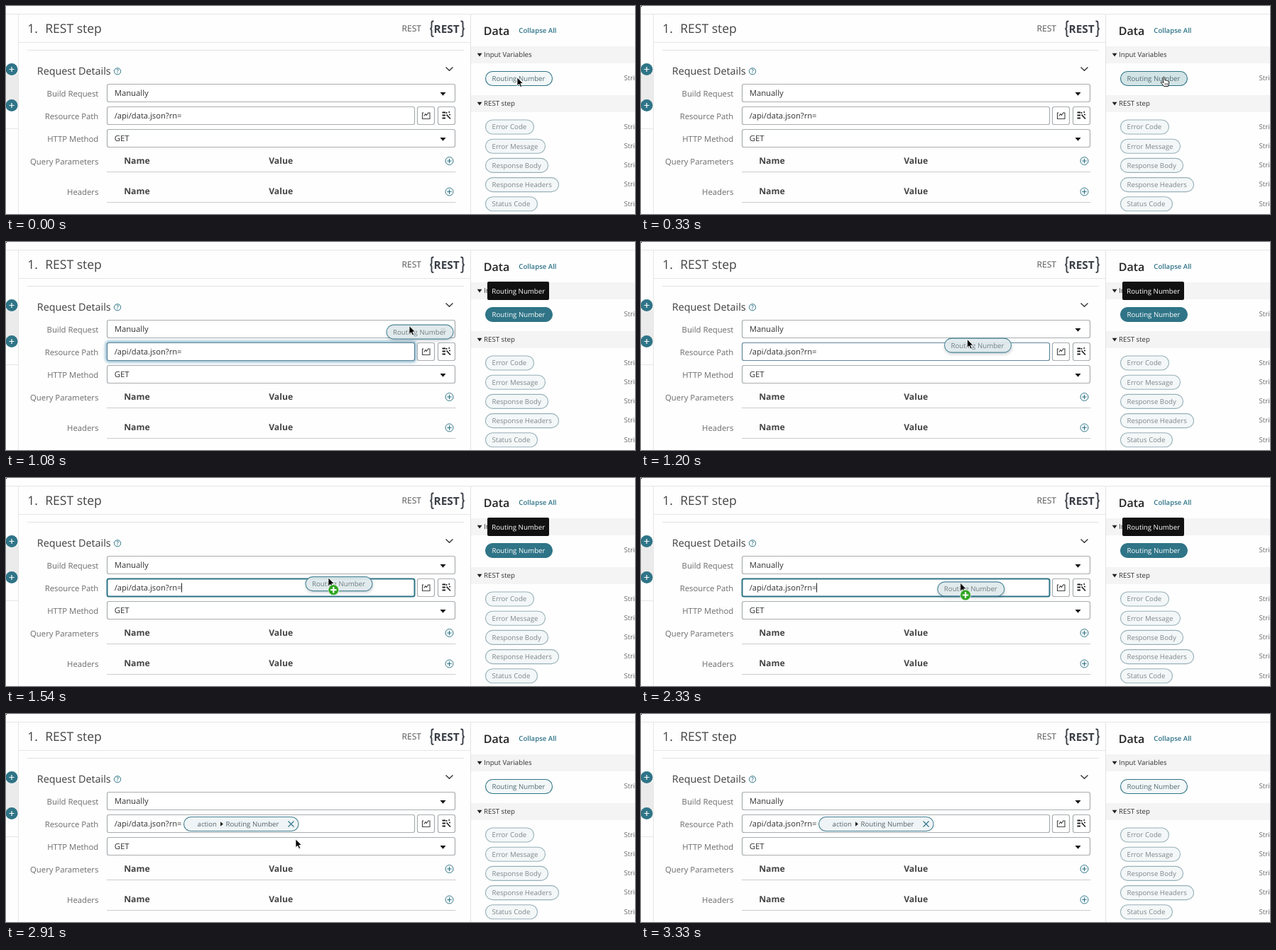
Write an HTML page that moves like this. It is 886 by 294 pixels and loops after 3.75 s.

```html
<!DOCTYPE html>
<html lang="en">
<head>
<meta charset="utf-8">
<title>Drag a variable into a path</title>
<style>
html, body { margin: 0; width: 100%; height: 100%; overflow: hidden; background: #fff; }
svg { display: block; width: 100vw; height: 100vh; }
text { font-family: "Open Sans", "Noto Sans", sans-serif; white-space: pre; text-rendering: geometricPrecision; }
</style>
</head>
<body>
<svg id="stage" viewBox="0 0 886 294"></svg>
<script>
const LOOP = 3750;
const TEAL = '#2f7487', PALE = '#f3f7f8', INK = '#333', GREY = '#6b6b6b', EDGE = '#a9adb0';
const stage = document.getElementById('stage');

function add(tag, attrs, parent = stage) {
  const node = document.createElementNS('http://www.w3.org/2000/svg', tag);
  for (const key in attrs) node.setAttribute(key, attrs[key]);
  parent.appendChild(node);
  return node;
}
const group = (attrs = {}, parent = stage) => add('g', attrs, parent);
const line = (d, stroke, width = 1, parent = stage) =>
  add('path', { d, fill: 'none', stroke, 'stroke-width': width }, parent);
const shape = (d, fill, parent = stage) => add('path', { d, fill }, parent);
const box = (x, y, width, height, attrs, parent = stage) =>
  add('rect', { x, y, width, height, ...attrs }, parent);
function label(str, x, y, size, fill = INK, attrs = {}, parent = stage) {
  const node = add('text', { x, y, 'font-size': size, fill, ...attrs }, parent);
  node.textContent = str;
  return node;
}
function pill(str, x, y, width, stroke, ink, parent = stage) {
  const g = group({}, parent);
  const back = box(x + .5, y + .5, width - 1, 20, { rx: 10, fill: PALE, stroke, 'stroke-width': 1.1 }, g);
  const text = label(str, x + 9.5, y + 13.9, 9.7, ink, {}, g);
  return { back, text };
}
const show = (node, alpha) => node.setAttribute('opacity', +alpha);

// Frame and left rail
box(0, 0, 886, 294, { fill: '#fefefe' });
box(0, 96, 17, 47, { fill: '#ebebeb' });
line('M0 11.5H886M17.5 12V294M18 51.5H654M0 173.5H17', '#e6e6e6');
line('M30 62.5H645', '#e2e2e2');
for (const y of [89.5, 140.5]) {
  add('circle', { cx: 8, cy: y, r: 8.5, fill: TEAL });
  line(`M4.5 ${y}H11.5M8 ${y - 3.5}v7`, '#fff', 1.2);
}

// Step header
label('1.', 30.2, 38, 17.5, '#444');
label('REST step', 55.3, 38, 17.5, '#444');
label('REST', 557.5, 36, 12.1, '#555');
label('REST', 602.6, 37.6, 15.4, '#3b3f47', { 'font-weight': 700 });
line('M602.5 21.5h-1q-2 0-2 2.5v5q0 2.8-2 3.2q2 .4 2 3.2v5q0 2.5 2 2.5h1', '#3b3f47', 1.9);
line('M640.5 21.5h1q2 0 2 2.5v5q0 2.8 2 3.2q-2 .4-2 3.2v5q0 2.5-2 2.5h-1', '#3b3f47', 1.9);

// Request form
label('Request Details', 43.8, 97, 14.35, '#3d3d3d');
add('circle', { cx: 157, cy: 92.3, r: 4.6, fill: 'none', stroke: TEAL });
label('?', 157, 95.2, 8, TEAL, { 'text-anchor': 'middle', 'font-weight': 600 });
line('M619.5 86.5L624.5 91.3L629.5 86.5', INK, 1.3);
const rows = [['Build Request', 128], ['Resource Path', 160], ['HTTP Method', 192],
  ['Query Parameters', 223.5], ['Headers', 267.3]];
for (const [str, y] of rows) label(str, 130.3, y, 11.3, GREY, { 'text-anchor': 'end' });

const inputBox = (x, y, w) =>
  box(x + .5, y + .5, w - 1, 25, { rx: 2.5, fill: '#fff', stroke: EDGE, 'stroke-width': 1.2 });
for (const [str, y] of [['Manually', 110], ['GET', 174]]) {
  inputBox(142, y, 491);
  label(str, 152.7, y + 17, 11.3);
  shape(`M611.5 ${y + 12}h8l-4 4.8z`, '#111');
}

const blur = add('filter', { id: 'blur', x: '-5%', y: '-60%', width: '110%', height: '220%' }, add('defs', {}));
add('feGaussianBlur', { stdDeviation: 1.9 }, blur);
const glow = box(142, 142, 434, 26, { rx: 3, fill: 'none', stroke: '#4f94b5', 'stroke-width': 3, filter: 'url(#blur)' });
const field = inputBox(142, 142, 434);
label('/api/data.json?rn=', 152.7, 159, 11.2);
const caret = line('M247.5 148.5V161.5', '#222');

inputBox(579, 142, 25);
line('M588.5 151H586.5V159.5H597V151H595', '#444', 1.1);
line('M588.8 155.5L591 152.5L592.3 154.5L595 150.5', '#444', 1.1);
inputBox(608, 142, 25);
line('M614.5 150.5H619M614.5 154.5H619M614.5 158.5H619', '#222', 2);
line('M620.5 153.5L626 159.5M620.5 150v2M623.5 150.5l1.5-1M624 153.5h2', '#222', 1.7);

for (const y of [222.5, 266]) {
  label('Name', 166.2, y, 12.2, '#444', { 'font-weight': 700 });
  label('Value', 370.2, y, 12.2, '#444', { 'font-weight': 700 });
  const cy = y - 3.5;
  add('circle', { cx: 624.5, cy, r: 5.5, fill: 'none', stroke: TEAL });
  line(`M621.3 ${cy}h6.4M624.5 ${cy - 3.2}v6.4`, TEAL, 1.2);
}
line('M142 234.5H633.5M142 277.5H633.5', '#cdcdcd');

// Data panel
line('M654.5 12V294', '#e2e2e2');
label('Data', 672.8, 41, 16, '#222', { 'font-weight': 600 });
label('Collapse All', 722.3, 38.3, 9.6, TEAL, { 'font-weight': 600 });
for (const [str, y] of [['Input Variables', 57], ['REST step', 126]]) {
  box(655, y, 231, 24, { fill: '#f4f4f4' });
  shape(`M663.7 ${y + 9.7}h6.8l-3.4 4.7z`, '#222');
  label(str, 673, y + 15.3, 9.7);
}
const typeLabel = y => label('String', 870.5, y, 9.7, GREY);
const source = pill('Routing Number', 675, 92, 95, TEAL, '#4f6b72');
typeLabel(105.3);
const outputs = [['Error Code', 69], ['Error Message', 85], ['Response Body', 89],
  ['Response Headers', 104], ['Status Code', 74]];
outputs.forEach(([str, width], i) => {
  const y = 160.5 + i * 27.2;
  pill(str, 675, y, width, '#97b0b7', '#7f878a');
  typeLabel(y + 13.3);
});

const tip = group();
box(678, 56, 87, 26, { rx: 2, fill: '#111' }, tip);
label('Routing Number', 684.2, 72.8, 9.7, '#fff', {}, tip);

// Dropped token
const token = group();
box(250.5, 145.5, 161.5, 20, { rx: 10, fill: '#eff4f6', stroke: '#457f90', 'stroke-width': 1.1 }, token);
label('action', 269.6, 159, 9.5, '#566368', {}, token);
label('Routing Number', 309.5, 159, 9.7, '#566368', {}, token);
const tokenTools = group({}, token);
shape('M302 152.3L306 155.5L302 158.7z', '#222', tokenTools);
line('M397.5 151.5l8 8m0-8l-8 8', TEAL, 1.1, tokenTools);

// Dragged copy and pointers
const drag = group();
box(-32, 1, 95, 20, { rx: 10, fill: '#456', opacity: .3, filter: 'url(#blur)' }, drag);
const ghost = pill('Routing Number', -32.5, -1.9, 95, '#3f8091', '#65757a', drag);
ghost.back.setAttribute('fill', '#dfe9ec');

const arrow = group();
add('path', { d: 'M0 0V11.8L2.7 9.3L4.7 13.6L6.7 12.7L4.8 8.5H8.4Z', fill: '#000', stroke: '#fff', 'stroke-width': .8 }, arrow);
const badge = group({}, arrow);
add('circle', { cx: 7.3, cy: 17.2, r: 7.4, fill: '#2fa51f', stroke: '#fff', 'stroke-width': .7 }, badge);
line('M3.1 17.2h8.4M7.3 13v8.4', '#fff', 2.2, badge);
const hand = group();
add('path', {
  d: 'M0 1Q0-.6 1.1-.4Q2 0 2.2 1.2L2.8 4.5Q4.3 3.5 4.9 5Q6.3 4.3 6.9 5.6Q8.3 5.1 8.4 7Q8.3 10 7.2 13H1.3Q-.5 10.5-3 7.8Q-3.2 6.3-1.6 6.7L.6 8Z',
  fill: '#fff', stroke: '#111'
}, hand);
line('M2.7 8.5v2.5M4.5 8.5v2.5M6.2 8.5v2.5', '#111', .7, hand);

const corner = box(0, 0, 1, 1, { fill: '#000' });

// Pointer stops: time, x, y
const route = [[0, 720, 101], [260, 735, 101], [520, 737, 99], [870, 737, 99], [940, 708, 94],
  [1200, 459.5, 137.5], [1540, 454, 141], [2330, 449.8, 148.3],
  [2660, 450, 149], [2760, 450, 149], [3300, 230, 295]];
const ramp = (t, a, b) => Math.min(1, Math.max(0, (t - a) / (b - a)));
function pointer(t) {
  let i = 0;
  while (i < route.length - 2 && t >= route[i + 1][0]) i++;
  const [a, ax, ay] = route[i], [b, bx, by] = route[i + 1];
  const k = ramp(t, a, b), e = k * k * (3 - 2 * k);
  return [ax + (bx - ax) * e, ay + (by - ay) * e];
}

function draw(t) {
  const at = `translate(${pointer(t).map(v => v.toFixed(2)).join(' ')})`;
  const over = t >= 160 && t < 940;
  const dragging = t >= 940 && t < 2480;
  const target = t >= 1270 && t < 2480;
  const dropped = t >= 2480;

  for (const node of [drag, arrow, hand]) node.setAttribute('transform', at);
  show(drag, dragging ? .93 : 0);
  show(hand, over);
  show(arrow, !over && t < 3330);
  show(badge, target);
  show(tip, t >= 930 && t < 2750);
  show(corner, t >= 40);

  source.back.setAttribute('fill', dragging ? TEAL : over ? '#d3e4e6' : PALE);
  source.text.setAttribute('fill', dragging ? '#fff' : '#4f6b72');

  const lit = dropped ? 1 - ramp(t, 2480, 2820) : ramp(t, 700, 850) * (1 - ramp(t, 1080, 1200));
  show(glow, lit);
  const focused = t >= 760 && !dropped;
  const edge = target ? TEAL : focused ? '#60879b' : lit ? '#8fa5af' : EDGE;
  field.setAttribute('stroke', edge);
  field.setAttribute('stroke-width', target ? 2 : 1.2);
  show(caret, target);
  show(token, dropped);
  show(tokenTools, ramp(t, 2740, 2860));
}

const start = performance.now();
function tick() {
  draw((performance.now() - start) % LOOP);
  requestAnimationFrame(tick);
}
draw(0);
requestAnimationFrame(tick);
</script>
</body>
</html>
```
